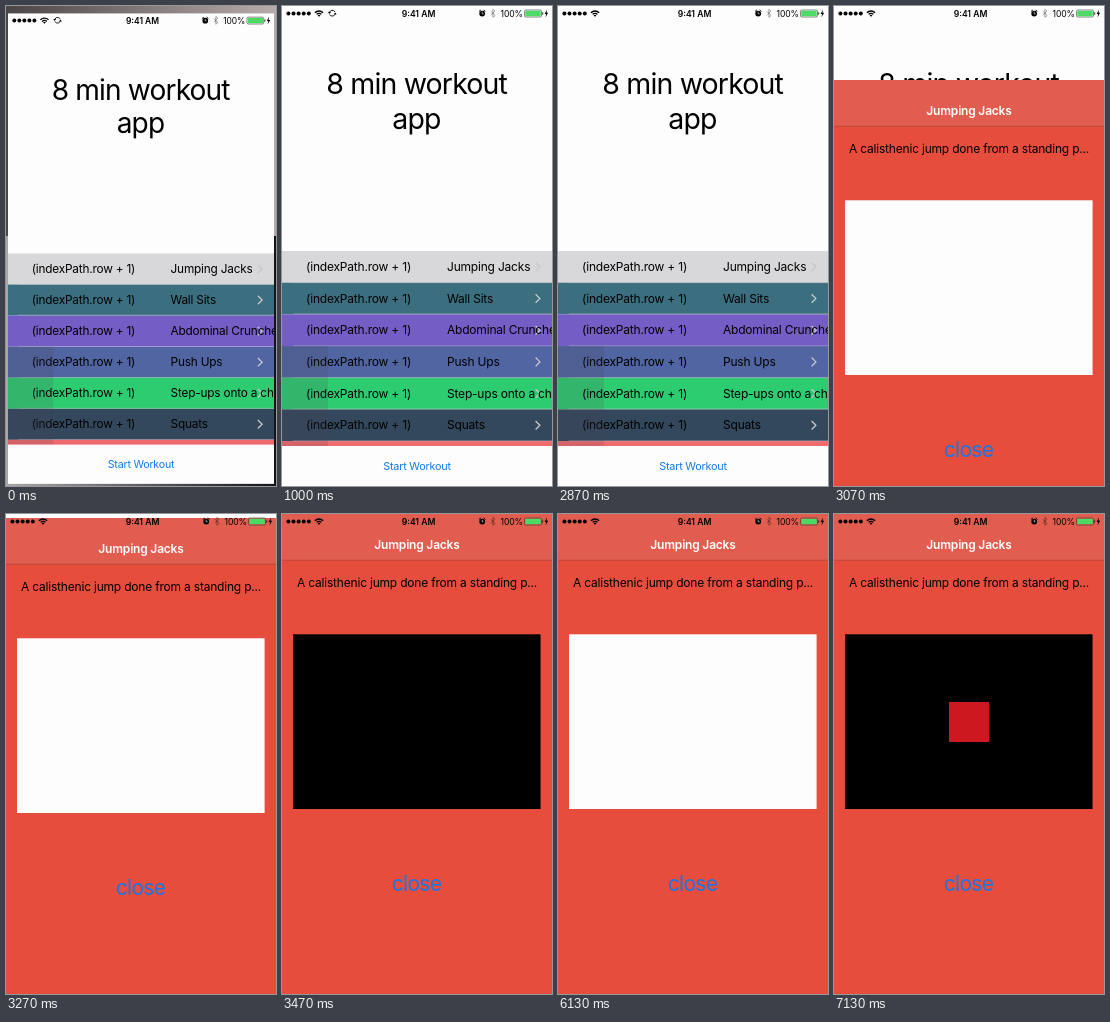
An HTML page with a canvas that plays this animation: 270 by 480 pixels, repeating every 7.54 s.

```html
<!DOCTYPE html>
<html lang="en">
<head>
<meta charset="utf-8">
<title>Workout app</title>
<style>
  html, body { margin: 0; width: 100%; height: 100%; overflow: hidden; background: #fff; }
  canvas { display: block; width: 270px; height: 480px; }
</style>
</head>
<body>
<canvas id="stage" width="270" height="480"></canvas>
<script>
const ctx = document.getElementById('stage').getContext('2d');
const W = 270, H = 480, LOOP = 7540;
const BLUE = '#1578e8';
const ROW_TOP = 245, ROW_HEIGHT = 31.68;
const ROWS = [
  ['Jumping Jacks', '#d8d7d9'],
  ['Wall Sits', '#3b6f80'],
  ['Abdominal Crunches', '#745dc4'],
  ['Push Ups', '#5065a1'],
  ['Step-ups onto a chair', '#2ecc71'],
  ['Squats', '#33485c'],
  ['', '#ef6a6f']
];

// Remaining distance (1 to 0) of a critically damped spring after s seconds.
const spring = s => s <= 0 ? 1 : (1 + 18.26 * s) * Math.exp(-18.26 * s);

function rect(x, y, w, h, color) {
  ctx.fillStyle = color;
  ctx.fillRect(x, y, w, h);
}

function text(str, x, y, size, { color = '#000', align = 'left', spacing = -0.2, weight = 400 } = {}) {
  ctx.font = `${weight} ${size}px Inter, sans-serif`;
  ctx.letterSpacing = spacing + 'px';
  ctx.textAlign = align;
  ctx.fillStyle = color;
  ctx.fillText(str, x, y);
}

function line(points, color, width) {
  ctx.beginPath();
  points.forEach(([x, y]) => ctx.lineTo(x, y));
  ctx.strokeStyle = color;
  ctx.lineWidth = width;
  ctx.stroke();
}

function arc(x, y, r, from, to, width) {
  ctx.beginPath();
  ctx.arc(x, y, r, from, to);
  ctx.strokeStyle = '#000';
  ctx.lineWidth = width;
  ctx.stroke();
}

function disc(x, y, r) {
  ctx.beginPath();
  ctx.arc(x, y, r, 0, 7);
  ctx.fillStyle = '#000';
  ctx.fill();
}

function polygon(points) {
  ctx.beginPath();
  points.forEach(([x, y]) => ctx.lineTo(x, y));
  ctx.fillStyle = '#000';
  ctx.fill();
}

function syncIcon(t) {
  ctx.save();
  ctx.globalAlpha = Math.max(0, Math.min(1, (2600 - t) / 160));
  ctx.translate(50.3, 7.2);
  ctx.rotate(t / 1000 * Math.PI * 2);
  for (let i = 0; i < 2; i++) {
    arc(0, 0, 2.9, 0.4, 2.7, 0.9);
    polygon([[1.2, 1.3], [4.2, 1.3], [3.2, -0.8]]);
    ctx.rotate(Math.PI);
  }
  ctx.restore();
}

function statusBar(t) {
  for (let i = 0; i < 5; i++) disc(6.4 + i * 5.1, 7.5, 2);
  for (const r of [1, 3.4, 5.8]) arc(37, 10.8, r, -Math.PI * 0.75, -Math.PI * 0.25, r === 1 ? 2 : 1.3);
  if (t < 2600) syncIcon(t);
  text('9:41 AM', 136.5, 10.6, 8.6, { align: 'center', weight: 600, spacing: 0 });

  disc(200.2, 7.6, 2.9);
  line([[197, 5.4], [198.8, 4]], '#000', 1);
  line([[201.6, 4], [203.4, 5.4]], '#000', 1);
  line([[200.2, 5.8], [200.2, 7.8], [201.6, 7.8]], '#fff', 0.6);
  line([[208.8, 5.2], [213, 9.4], [210.9, 11.3], [210.9, 3.3], [213, 5.2], [208.8, 9.4]], 'rgba(0,0,0,.5)', 0.7);
  text('100%', 218.5, 10.6, 8.6, { spacing: -0.1 });

  ctx.beginPath();
  ctx.roundRect(242.5, 4, 17, 7, 1.4);
  ctx.strokeStyle = '#333';
  ctx.lineWidth = 0.6;
  ctx.stroke();
  rect(243.3, 4.8, 15.4, 5.4, '#4cd964');
  rect(260.2, 6.3, 1, 2.4, '#333');
  polygon([[265, 3.5], [262.6, 8], [264.2, 8], [263.4, 11.5], [266.2, 6.8], [264.5, 6.8]]);
}

function listScreen() {
  rect(0, 0, W, H, '#fefdfe');
  text('8 min workout', 134.7, 88, 28.5, { align: 'center', spacing: -0.85 });
  text('app', 134.5, 122.5, 28.5, { align: 'center', spacing: -0.85 });

  ROWS.forEach(([name, color], i) => {
    const top = ROW_TOP + i * ROW_HEIGHT, mid = top + ROW_HEIGHT / 2;
    rect(0, top, W, ROW_HEIGHT, color);
    if (i) rect(10.8, Math.round(top) - 0.5, W, 0.6, 'rgba(200,199,204,.6)');
    if (!name) return;
    line([[253.6, mid - 4.3], [257.9, mid], [253.6, mid + 4.3]], '#c7c7cc', 1.3);
    text('(indexPath.row + 1)', 24, mid + 4.1, 12);
    text(name, 165, mid + 4.1, 12);
  });
  rect(0, 340, 46, 100, 'rgba(75,65,80,.16)');
  rect(0, 440, W, 40, '#fefdfe');
  text('Start Workout', 135, 464, 10.8, { align: 'center', color: BLUE });
}

function detailScreen(t) {
  rect(0, 0, W, H, '#e74d3c');
  rect(0, 0, W, 46, '#e15d50');
  rect(0, 45.8, W, 0.7, '#a8463b');
  text('Jumping Jacks', 135, 34.7, 12, { align: 'center', color: '#fff', weight: 600 });
  text('A calisthenic jump done from a standing p...', 15, 73, 12);

  const loaded = t >= 6800;
  const dark = t >= 3400 && t < 3870 || loaded;
  rect(11, 120.3, 247.6, 174.7, dark ? '#000' : '#fefdfe');
  if (loaded) rect(115, 188, 40, 40, '#cc181e');
  text('close', 134.5, 376.8, 21, { align: 'center', color: BLUE, spacing: -0.75 });
}

function band(y, h, left, right) {
  const g = ctx.createLinearGradient(0, 0, W, 0);
  g.addColorStop(0, left);
  g.addColorStop(1, right);
  rect(0, y, W, h, g);
}

function draw(t) {
  const shrink = spring(t / 1000 + 0.32);
  band(0, 230, '#4a4546', '#b8abab');
  band(230, 250, '#a9a6a8', '#141416');
  ctx.save();
  if (shrink > 1e-4) {
    ctx.translate(W / 2 * 0.75 * shrink, 370 * shrink);
    ctx.scale(1 - 0.75 * shrink, 1 - shrink);
  }
  ctx.beginPath();
  ctx.rect(0, 0, W, H);
  ctx.clip();
  listScreen();
  if (t >= 2888) {
    ctx.save();
    ctx.translate(0, Math.round(H * spring((t - 2888) / 1000)));
    detailScreen(t);
    ctx.restore();
  }
  statusBar(t);
  ctx.restore();
}

function tick() {
  draw(performance.now() % LOOP);
  requestAnimationFrame(tick);
}
tick();
</script>
</body>
</html>
```
